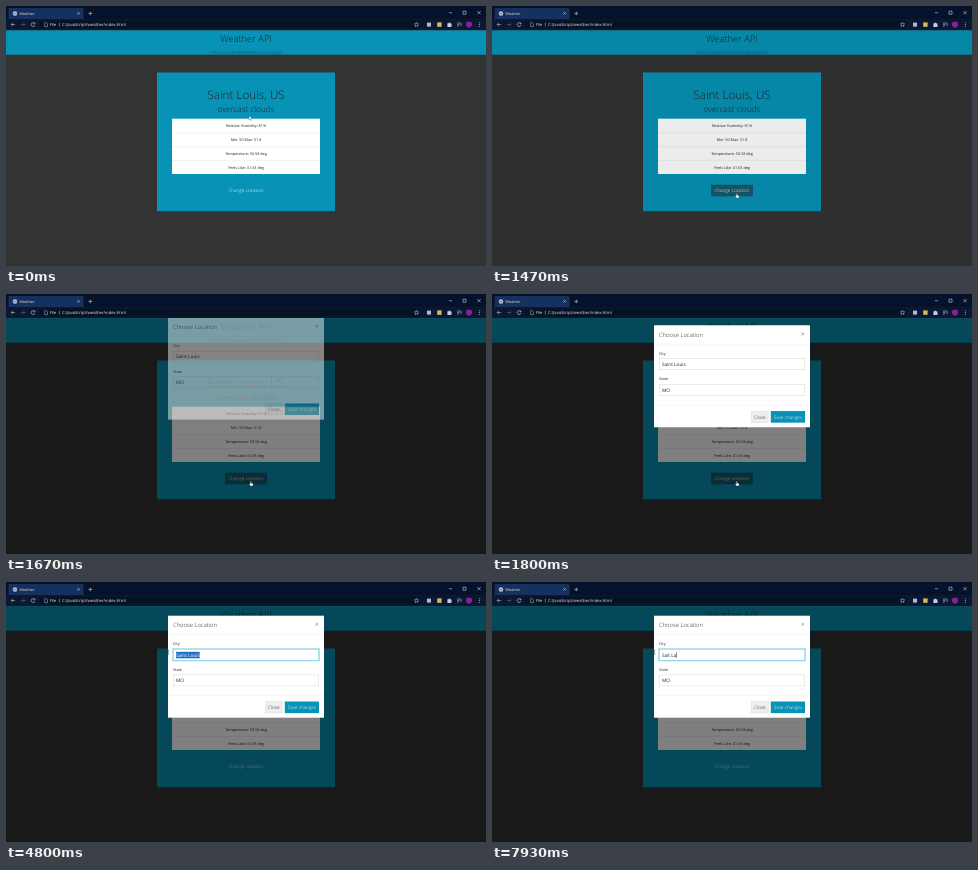
An HTML page that plays this animation: 480 px wide and 260 px high, repeating every 8 s.

```html
<!DOCTYPE html>
<html lang="en">
<head>
<meta charset="utf-8">
<title>Weather</title>
<style>
  html, body { margin: 0; width: 100%; height: 100%; overflow: hidden; background: #333; }
  svg { display: block; width: 100vw; height: 100vh; }
  text { font-family: "Open Sans", "Noto Sans", sans-serif; font-size: 4.69px; fill: #222;
         white-space: pre; text-rendering: geometricPrecision; }
  .light { font-weight: 300; }
  .mid { text-anchor: middle; }
  .small { font-size: 3.75px; }
  .ui { fill: #e4e8f0; }
  .line { fill: none; stroke: #c9d0dc; stroke-width: .6; }
  .rule { stroke: #ddd; stroke-width: .4; }
  .field { fill: #fff; stroke: #ccc; stroke-width: .4; }
</style>
</head>
<body>
<svg viewBox="0 0 480 260" preserveAspectRatio="none">
  <defs><clipPath id="view"><rect y="24" width="480" height="236"/></clipPath></defs>

  <!-- browser window -->
  <rect width="480" height="24.5" fill="#06122a"/>
  <path d="M1 13.5Q2.5 13.5 2.5 12V3.5Q2.5 2 4 2H76Q77.5 2 77.5 3.5V12Q77.5 13.5 79 13.5Z" fill="#17315e"/>
  <rect y="13.2" width="480" height="11.3" fill="#0a1831"/>
  <rect x="33.5" y="14.4" width="381.5" height="8.4" rx="4.2" fill="#071225"/>
  <circle cx="9" cy="7.5" r="2.2" fill="#d5dbe6"/>
  <path d="M7 7.5H11M9 5.4V9.6" stroke="#45597c" stroke-width=".5"/>
  <text class="ui small" x="13.6" y="8.8">Weather</text>
  <g class="line">
    <path d="M71.3 6.2l2.4 2.4m0-2.4l-2.4 2.4M82.4 7.4h3.8M84.3 5.5v3.8"/>
    <path d="M443 6.7h3.2M457 5.2h3v3h-3zM471.4 5.1l3.2 3.2m0-3.2l-3.2 3.2"/>
    <path d="M9 18.5H5.2m1.7-1.7l-1.7 1.7l1.7 1.7"/>
    <path d="M15 18.5h3.8m-1.7-1.7l1.7 1.7l-1.7 1.7" stroke="#5c6a82"/>
    <path d="M28.7 17.6a1.9 1.9 0 1 0 .2 1.5M28.9 16.5v1.4h-1.4"/>
    <path d="M38.7 16.6h1.8l1 1v3.1h-2.8zM53.4 16.4v4.2" stroke-width=".45"/>
    <path d="M410.5 16.3l.65 1.5 1.6.1-1.2 1.05.4 1.6-1.45-.85-1.45.85.4-1.6-1.2-1.05 1.6-.1z" stroke-width=".5"/>
    <path d="M451 17h3.5M451 18.6h2.4M451 20.2h1.6M455 17v3"/>
  </g>
  <text class="ui" x="43.8" y="20.1" style="font-size:4.1px">File</text>
  <text class="ui" x="56" y="20.1" style="font-size:4.17px">C:/JavaScript/weather/index.html</text>
  <rect x="421" y="16.6" width="4" height="4" fill="#a8bfdc"/>
  <rect x="431.2" y="16.4" width="4.4" height="4.4" fill="#d9b95a"/>
  <path d="M441.4 17.2h1.3a.7 .7 0 0 1 1.4 0h1.2v1.2a.7 .7 0 0 1 0 1.4v1.2h-3.9z" fill="#b9d0f2"/>
  <circle cx="463" cy="18.5" r="3" fill="#8a1f9e"/>
  <g fill="#c9d0dc"><circle cx="473.3" cy="16.8" r=".5"/><circle cx="473.3" cy="18.6" r=".5"/><circle cx="473.3" cy="20.4" r=".5"/></g>

  <!-- page -->
  <rect y="24.3" width="480" height="235.7" fill="#333"/>
  <rect y="24.3" width="480" height="24.4" fill="#0892b5"/>
  <text class="light mid" x="240" y="36.4" style="font-size:9.375px">Weather API</text>
  <text class="mid" x="240" y="47.6" style="fill:#0b5f78">https://openweathermap.org/api</text>
  <rect x="151" y="66.5" width="178" height="138.7" fill="#0892b5"/>
  <text class="light mid" x="240" y="93" style="font-size:11.72px">Saint Louis, US</text>
  <text class="light mid" x="240" y="106" style="font-size:8.2px">overcast clouds</text>
  <rect x="166" y="112.7" width="148" height="55.3" fill="#fff"/>
  <g id="rows"></g>
  <rect id="hover" x="219.6" y="179.1" width="41" height="10.9" fill="#1a5a6d" stroke="#124553" stroke-width=".5"/>
  <text class="light mid" x="240" y="186.2" style="fill:#fff">Change Location</text>
  <rect id="shade" y="24.3" width="480" height="235.7"/>

  <!-- dialog -->
  <g clip-path="url(#view)"><g id="modal">
    <rect x="162" y="33.7" width="156" height="102" fill="#fff"/>
    <text class="light" x="167" y="45.2" style="font-size:5.86px">Choose Location</text>
    <path d="M309.4 41l2.6 2.6m0-2.6l-2.6 2.6" stroke="#777" stroke-width=".6"/>
    <path class="rule" d="M162 52.6H318M162 113.6H318" style="stroke:#e6e6e6"/>
    <text class="small" x="167" y="63">City</text>
    <rect id="glow" x="166.6" y="66.6" width="146.8" height="12.2" fill="none" stroke="#0892b5" stroke-opacity=".28" stroke-width="1.2"/>
    <rect id="city" class="field" x="167.2" y="67.2" width="145.6" height="11"/>
    <rect id="mark" y="69.8" height="6.5" fill="#2271c9"/>
    <text id="value" x="170" y="74.5"></text>
    <rect id="caret" y="70" width=".45" height="6" fill="#222"/>
    <text class="small" x="167" y="88.6">State</text>
    <rect class="field" x="167.2" y="92.9" width="145.6" height="11"/>
    <text x="170" y="100.2">MO</text>
    <rect x="259.4" y="119.7" width="16.8" height="11.2" fill="#eee" stroke="#d4d4d4" stroke-width=".4"/>
    <text class="light mid" x="267.8" y="127">Close</text>
    <rect x="278.8" y="119.5" width="34.2" height="11.6" fill="#0892b5"/>
    <text class="light mid" x="295.9" y="127" style="fill:#fff">Save changes</text>
  </g></g>

  <!-- pointers, hot spot at 0,0 -->
  <path id="arrow" d="M0 0V4.4L1 3.5L1.7 5L2.4 4.7L1.8 3.2H3.1Z" fill="#fff" stroke="#222" stroke-width=".3"/>
  <path id="hand" d="M0 .2Q.5-.3 .9 .2V1.8L2.5 2.2Q3 2.5 2.8 3.2L2.4 4.9H.3L-1.1 3.1Q-1.2 2.4 0 2.7Z" fill="#fff" stroke="#222" stroke-width=".3"/>
  <path id="beam" d="M-.9-2.3Q0-2.3 0-1.8Q0-2.3 .9-2.3M0-1.8V1.8M-.9 2.3Q0 2.3 0 1.8Q0 2.3 .9 2.3" fill="none" stroke="#444" stroke-width=".5"/>
</svg>
<script>
const LOOP = 8000;
const $ = id => document.getElementById(id);
const set = (id, attrs) => {
  for (const k in attrs) $(id).setAttribute(k, attrs[k]);
};
const show = (id, on) => set(id, { visibility: on ? 'visible' : 'hidden' });
const clamp = v => Math.min(1, Math.max(0, v));

$('rows').innerHTML = ['Relative Humidity: 81%', 'Min: 50 Max: 51.8', 'Temperature: 50.58 deg', 'Feels Like: 41.63 deg']
  .map((label, i) => {
    const y = 121.4 + i * 13.75;
    const rule = i ? `<path class="rule" d="M166 ${y - 8.2}H314"/>` : '';
    return `${rule}<text class="small mid" x="240" y="${y}">${label}</text>`;
  }).join('');

// time, x, y
const path = [
  [0, 243, 109.5], [270, 243, 109.5], [870, 244.3, 187.2], [1830, 244.3, 187.2],
  [2070, 246, 108], [2930, 198, 73], [3130, 194, 73], [3200, 190, 72.6],
  [3670, 162.4, 70.3], [LOOP, 162.4, 70.3]
];
// time, text typed
const keys = [[5870, 'S'], [6470, 'a'], [6600, 'l'], [6730, 't'], [6930, ' '], [7330, 'L'], [7930, 'a']];

const OPEN = 1448, SLIDE = 1600, FOCUS = 3070, DRAG = 3240, BLINK = 530;

// cubic-bezier(0, 0, .58, 1)
function easeOut(p) {
  let lo = 0, hi = 1;
  for (let i = 0; i < 20; i++) {
    const u = (lo + hi) / 2;
    if (1.74 * (1 - u) * u * u + u ** 3 < p) lo = u; else hi = u;
  }
  return 3 * (1 - lo) * lo * lo + lo ** 3;
}

function pointerAt(t) {
  const i = path.findIndex(p => p[0] > t);
  const [t0, x0, y0] = path[i - 1], [t1, x1, y1] = path[i];
  const p = (t - t0) / (t1 - t0), e = p * p * (3 - 2 * p);
  return [x0 + (x1 - x0) * e, y0 + (y1 - y0) * e];
}

function drawField(t, x) {
  const typed = keys.filter(k => k[0] <= t);
  const focused = t >= FOCUS;
  const selected = t >= DRAG && !typed.length;
  $('value').textContent = typed.length ? typed.map(k => k[1]).join('') : 'Saint Louis';
  $('value').style.fill = selected && x <= 170 ? '#fff' : '#222';
  const end = 170 + $('value').getComputedTextLength();
  const from = Math.max(170, x);
  show('glow', focused);
  $('city').style.stroke = focused ? '#35b9e6' : '#ccc';
  set('mark', { x: from, width: selected ? Math.max(0, end - from) : 0 });
  const since = t - (typed.length ? typed[typed.length - 1][0] : FOCUS);
  set('caret', { x: end + .1, opacity: focused && !selected && since % (2 * BLINK) < BLINK ? 1 : 0 });
}

function draw(t) {
  const [x, y] = pointerAt(t);
  const over = x > 219 && x < 261 && y > 179 && y < 190;
  const kind = over ? 'hand' : y > 66 && y < 78.5 ? 'beam' : 'arrow';
  for (const id of ['arrow', 'hand', 'beam']) show(id, id === kind);
  set(kind, { transform: `translate(${x} ${y})` });
  show('hover', over);

  set('shade', { opacity: clamp((t - OPEN) / 150) * .5 });
  set('modal', {
    opacity: clamp((t - SLIDE) / 150),
    transform: `translate(0 ${-15.6 * (1 - easeOut(clamp((t - SLIDE) / 300)))})`
  });
  drawField(t, x);
}

function tick() {
  const step = Math.floor((performance.now() % LOOP + 4) * .015) % 120;
  draw(Math.round(step * 20 / 3) * 10);
  requestAnimationFrame(tick);
}
tick();
</script>
</body>
</html>
```
